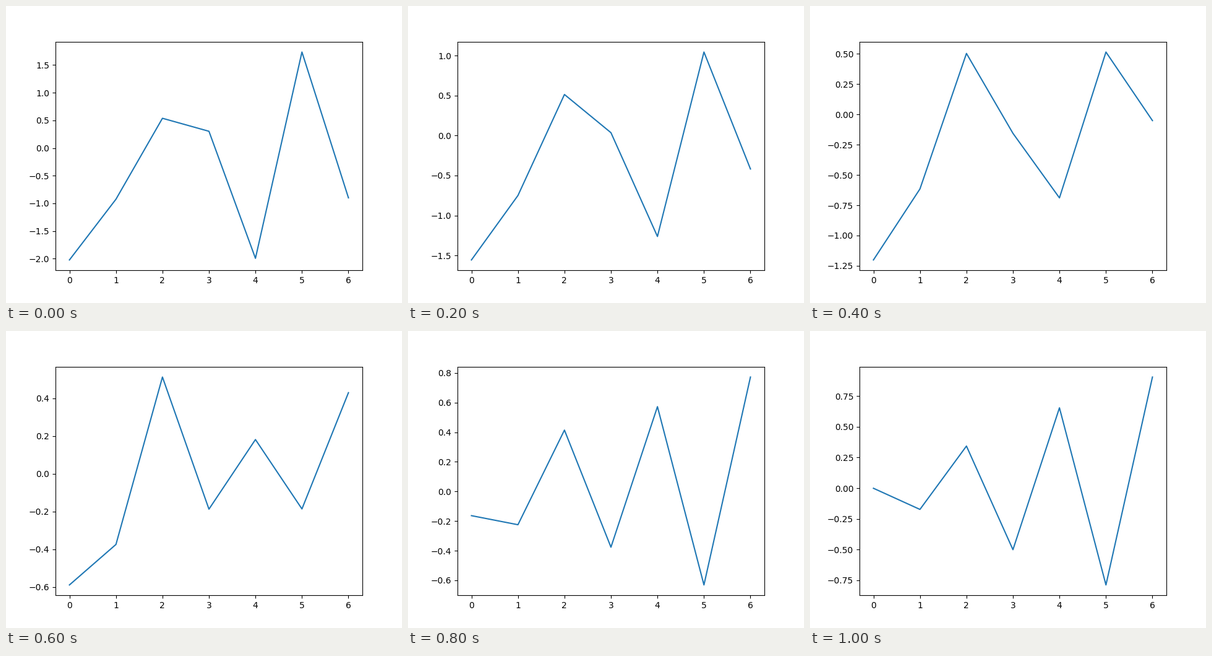
Write a matplotlib script that moves like this. It is 640 px wide and 480 px high and loops after 1.2 s.

```python
import matplotlib.pyplot as plt
import numpy as np
from matplotlib.animation import FuncAnimation

STEPS = 6
MIDWAY = 2

x = np.arange(7)
opening = np.array([-2.022, -0.925, 0.538, 0.303, -1.993, 1.735, -0.9])
middle = np.array([-1.197, -0.615, 0.495, -0.17, -0.7, 0.513, -0.047])
closing = 1.157 * np.sin((np.pi + 0.15) * x)  # growing zigzag
ripple = 0.13 * (0.5 - np.cos(x))


def blend(start, end, t, power):
    """Ease out from one pose to another."""
    return end + (start - end) * (1 - t) ** power


def heights(step):
    if step < MIDWAY:
        pose = blend(opening, middle, step / MIDWAY, 1.2)
    else:
        t = (step - MIDWAY) / (STEPS - 1 - MIDWAY)
        pose = blend(middle, closing, t, 2)
    # A brief ripple passes during the second half.
    return pose + ripple * np.exp(-((step - 3.3) / 0.8) ** 2)


fig, ax = plt.subplots(figsize=(6.4, 4.8), dpi=100)
line, = ax.plot(x, heights(0))


def draw(step):
    line.set_ydata(heights(step))
    ax.relim()
    ax.autoscale_view()
    return line,


anim = FuncAnimation(fig, draw, frames=STEPS, interval=200,
                     repeat=True, repeat_delay=0, blit=False)
plt.show()
```
